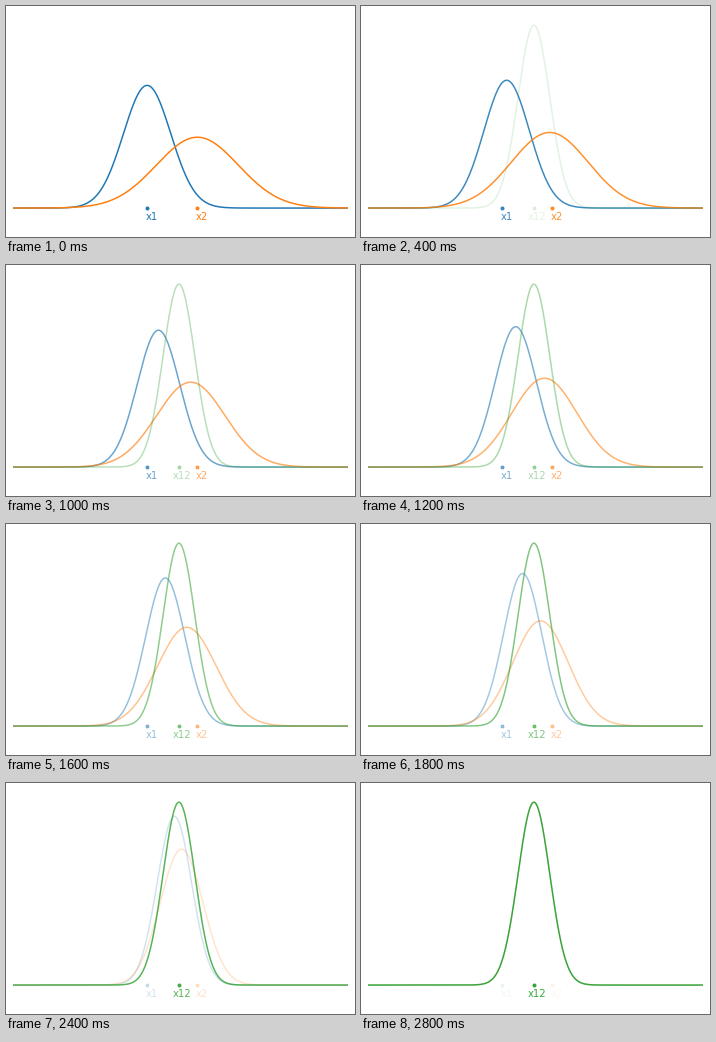
Recreate the animation shown at these times as a matplotlib script. Size 349 by 231 pixels, loop 3000 ms.

```python
import numpy as np
import matplotlib.pyplot as plt
from matplotlib.animation import FuncAnimation

W, H, DPI = 349, 231, 72
FRAMES, INTERVAL = 15, 200
MERGED = (-0.1, 0.9)  # mean, variance

# name, mean, variance, colour, label shift
CURVES = [
    ("x1", -2.0, 2.0, "tab:blue", 0.1),
    ("x2", 1.0, 6.0, "tab:orange", 0.1),
    ("x12", *MERGED, "tab:green", 0.4),
]


def normal(x, mean, var):
    return np.exp(-(x - mean) ** 2 / (2 * var)) / np.sqrt(2 * np.pi * var)


def mix(a, b, t):
    return a + (b - a) * t


# The tiny surplus keeps the pixel size from being truncated down
fig = plt.figure(figsize=((W + 1e-3) / DPI, (H + 1e-3) / DPI), dpi=DPI,
                 facecolor="white")
ax = fig.add_axes([7.2 / W, 7.2 / H, 334.8 / W, 217.44 / H])
ax.set_xlim(-10, 10)
ax.set_ylim(-0.05, 0.45)
ax.axis("off")

xs = np.linspace(-10, 10, 1000)
lines, dots, labels = [], [], []
for name, mean, var, color, shift in CURVES:
    lines.append(ax.plot(xs, normal(xs, mean, var), color=color, lw=1.5)[0])
    dots.append(ax.plot([mean], [0], ".", color=color, ms=6)[0])
    labels.append(ax.text(mean - shift, -0.028, name, color=color,
                          fontsize=10, family="DejaVu Sans"))


def update(i):
    t = i / (FRAMES - 1)
    fade = i / FRAMES
    for k, (name, mean, var, *_) in enumerate(CURVES):
        m, v = mix(mean, MERGED[0], t), mix(var, MERGED[1], t)
        lines[k].set_ydata(normal(xs, m, v))
        alpha = fade if name == "x12" else 1 - fade
        for artist in (lines[k], dots[k], labels[k]):
            artist.set_alpha(alpha)
    return lines + dots + labels


anim = FuncAnimation(fig, update, frames=FRAMES, interval=INTERVAL,
                     init_func=lambda: update(0), repeat=True, repeat_delay=0)
plt.show()
```
